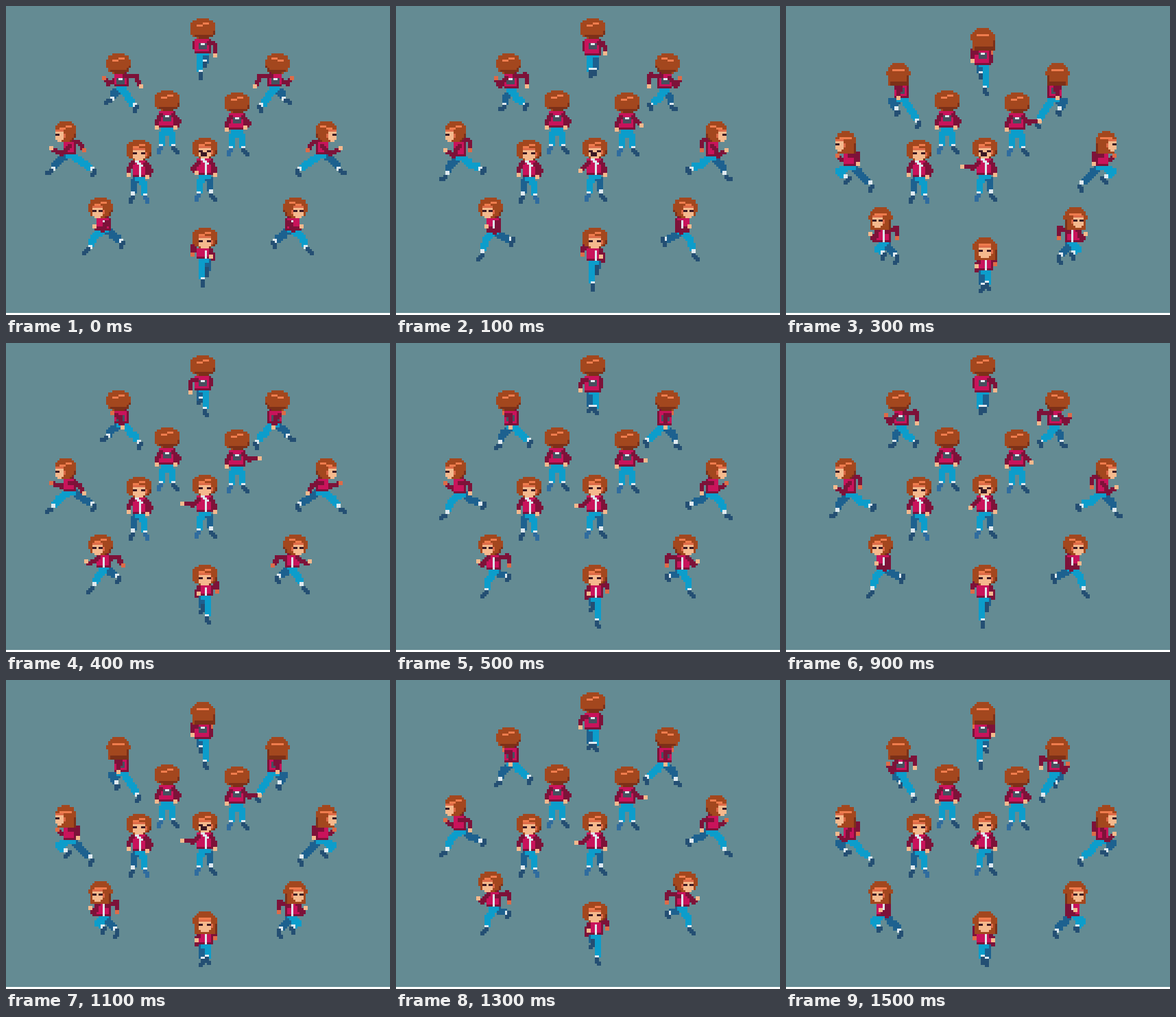
An HTML page with a canvas that plays this animation: 560 by 450 pixels, repeating every 1600 ms.

```html
<!DOCTYPE html>
<html lang="en">
<head>
<meta charset="utf-8">
<title>Run cycle turnaround</title>
<style>
html, body { margin: 0; width: 100%; height: 100%; overflow: hidden; background: #648b93; }
canvas { display: block; }
</style>
</head>
<body>
<canvas id="stage" width="560" height="450"></canvas>
<script>
const ctx = document.getElementById('stage').getContext('2d');
const CELL = 3, STEP = 100, POSES = 8, TILT = 0.25;
const C = {
  bg: '#648b93', hair: '#a3471e', hairDark: '#7c3018', glow: '#ef7c4d',
  skin: '#f5b98d', warm: '#de6b48', eye: '#3b1824',
  pink: '#c9135b', wine: '#7d1239', white: '#dfeaf0', ink: '#46505f',
  jean: '#0c9dcb', jeanDark: '#1d618f', shoe: '#244f73', shoeLit: '#2f6c9e'
};
const { cos, sin, PI, abs, round, sign, max, hypot } = Math;
const rad = deg => deg * PI / 180;
const lerp = (a, b, t) => a.map((v, i) => v + (b[i] - v) * t);

// Drawing is done in cells around an origin that may be mirrored.
let ox = 0, oy = 0, dir = 1;

function box(color, x, y, w, h) {
  ctx.fillStyle = color;
  ctx.fillRect(ox + (dir > 0 ? x : -x - w) * CELL, oy + y * CELL, w * CELL, h * CELL);
}

function line(color, w, [x0, y0], [x1, y1]) {
  const n = Math.ceil(max(1, abs(x1 - x0), abs(y1 - y0))), off = w / 2;
  for (let i = 0; i <= n; i++) {
    const t = i / n;
    box(color, round(x0 + (x1 - x0) * t - off), round(y0 + (y1 - y0) * t - off), w, w);
  }
}

// Body points are [forward, rightward, down], seen from heading h (90 faces the viewer).
const depth = ([f, s], h) => f * sin(h) + s * cos(h);
const project = (p, h) => [p[0] * cos(h) - p[1] * sin(h), p[2] + TILT * depth(p, h)];

// Middle joint of a limb made of two equal bones.
function joint(a, b, bone, bend) {
  const df = b[0] - a[0], dd = b[2] - a[2], len = hypot(df, dd) || 1;
  const out = bend * Math.sqrt(max(0, bone * bone - len * len / 4)) / len;
  const mid = lerp(a, b, 0.5);
  return [mid[0] + dd * out, mid[1], mid[2] - df * out];
}

function runLeg(p, side, hipY) {
  const a = 2 * PI * (p - 0.3) / POSES;
  const f = -5 - 11 * cos(a) + 3 * cos(2 * a);
  const d = hipY + 10 + 3 * cos(2 * PI * (p - 5.9) / POSES);
  const hip = [-2.5, side * 1.2, hipY];
  const ankle = [f - 1, side * 1.4, d - 2];
  const lift = f < -6 ? 0.6 : 0;
  return { hip, knee: joint(hip, ankle, 6.5, 1), ankle, toe: [f + 1 - lift, side * 1.5, d + lift - 0.5] };
}

function runArm(p, side) {
  const swing = cos(2 * PI * (p - 0.2) / POSES);
  const shoulder = [-1.5, side * 3.2, 11.5];
  const hand = [8 * swing - 1, side * (4.5 - 1.5 * swing), 14 - 1.5 * swing];
  const elbow = joint(shoulder, hand, 5, -1);
  elbow[1] += side;
  return { shoulder, elbow, hand };
}

function runPose(p) {
  const hipY = 17 - cos(PI * p / 2);
  return {
    hip: [-2.5, 0, hipY], neck: [-1.5, 0, 9], low: p % 4 === 3, shoe: C.shoe,
    legs: [runLeg(p, -1, hipY), runLeg(p + 4, 1, hipY)],
    arms: [runArm(p, -1), runArm(p + 4, 1)]
  };
}

// Standing: one hand on the hip or hanging, the other may reach out sideways.
function standPose(hipSide, reach, lead, mouth) {
  const leg = side => ({
    hip: [0, side * 1.5, 18], knee: [side * lead, side * 2.3, 22],
    ankle: [side * lead, side * 2.8, 28], toe: [side * lead, side * 4.5, 29.8]
  });
  const arm = side => {
    const active = side === hipSide;
    const rest = [0, side * (active ? 4 : 5), 17.5];
    const hand = active ? lerp(rest, [0, side * 11.5, 14], reach) : rest;
    const elbow = [0, side * (active ? 6 : 5), 14.5];
    return { shoulder: [0, side * 3.2, 11.5], elbow, hand };
  };
  return {
    hip: [0, 0, 18], neck: [0, 0, 9], low: false, mouth, shoe: C.shoeLit, still: true,
    legs: [leg(-1), leg(1)], arms: [arm(-1), arm(1)]
  };
}

function drawLeg(l, h, color, shoe) {
  const at = q => project(q, h);
  line(color, 3, at(l.hip), at(l.knee));
  line(color, 3, at(l.knee), at(lerp(l.knee, l.ankle, 0.5)));
  line(C.skin, 1, at(lerp(l.knee, l.ankle, 0.8)), at(l.ankle));
  const cuff = at(lerp(l.knee, l.ankle, 0.75));
  line(C.white, 2, cuff, cuff);
  line(shoe, 2, at(l.ankle), at(l.toe));
}

function drawArm(a, h, skin) {
  const [s, e, w] = [a.shoulder, a.elbow, a.hand].map(q => project(q, h));
  line(C.wine, 2, s, e);
  line(C.wine, 2, e, w);
  line(skin, 2, w, w);
}

function drawTorso(pose, h) {
  const top = project(pose.neck, h), end = project(pose.hip, h);
  const rows = round(end[1]) - 9, w = round(6 + 1.5 * abs(sin(h)));
  for (let i = 0; i < rows; i++) {
    const width = i === 0 ? w - 2 : w;
    const x = round(top[0] + (end[0] - top[0]) * i / rows - width / 2);
    box(i > rows - 2 ? C.wine : C.pink, x, 9 + i, width, 1);
    box(C.wine, x + width - 1, 9 + i, 1, 1);
    if (sin(h) > 0.5 && i > 1) box(C.white, x + (w >> 1), 9 + i, 1, 1);
  }
  const x = round(top[0]);
  if (sin(h) < -0.5) {
    box(C.ink, x - 2, 12, 4, 3);
    box(C.white, x - 1, 12, 2, 1);
  } else if (pose.still) {
    for (let i = 0; i < 3; i++) box(C.white, x - 2 + i, 10 + i, 2, 1);
  }
}

function drawHead(pose, h) {
  const { low, mouth } = pose, front = sin(h), back = front < -0.5;
  const rows = low ? 11 : 10, wide = 5 + abs(front);
  for (let y = 0; y < rows; y++) {
    const t = abs((y + 0.5) / rows * 2 - 1), n = low ? 2.2 : 2.6;
    const half = low && y > rows / 2 ? wide - 0.5 : wide * (1 - t ** n) ** (1 / n);
    const left = round(-half), w = round(half) - left;
    box(C.hair, left, y, w, 1);
    if (y > rows - 3 && back) box(C.hairDark, left + 1, y, w - 2, 1);
    if (y > rows / 2) box(C.hairDark, left + w - 1, y, 1, 1);
  }
  box(C.glow, -3, 3, 3, 1);
  box(C.glow, 0, low ? 3 : 2, 3, 1);
  if (back) return;

  const w = round(4 + 2 * front), x = round(3 * cos(h) * abs(cos(h)) - w / 2);
  box(C.warm, x, 4, w, 1);
  box(C.skin, x, 5, w, 4);
  box(C.skin, x + 1, 9, w - 2, 1);
  box(C.warm, x + w, 6, 1, 2);
  box(C.eye, x, 6, 2, 1);
  if (front > 0.5) box(C.eye, x + w - 2, 6, 2, 1);
  if (mouth) box(C.eye, x + 1, 7, 3, 2);
}

function figure(pose, h) {
  const legDepth = l => depth(l.knee, h) + depth(l.toe, h);
  const armDepth = a => depth(a.hand, h);
  const [farLeg, nearLeg] = [...pose.legs].sort((a, b) => legDepth(a) - legDepth(b));
  const [farArm, nearArm] = [...pose.arms].sort((a, b) => armDepth(a) - armDepth(b));
  const even = legDepth(nearLeg) - legDepth(farLeg) < 0.2;
  const hidden = armDepth(farArm) < -2;
  const hip = project(pose.hip, h);

  if (hidden) drawArm(farArm, h, C.warm);
  drawLeg(farLeg, h, even ? C.jean : C.jeanDark, C.shoe);
  line(C.jean, 3, [hip[0] - 1, hip[1]], [hip[0] + 1, hip[1]]);
  drawLeg(nearLeg, h, C.jean, pose.shoe);
  drawTorso(pose, h);
  if (!hidden) drawArm(farArm, h, pose.still ? C.skin : C.warm);
  drawArm(nearArm, h, C.skin);
  drawHead(pose, h);
}

function place(x, y, mirrored) {
  ox = x; oy = y; dir = mirrored ? -1 : 1;
}

// Heading, head position and, for turned runners, the x of the mirrored twin.
const ring = [
  { deg: 270, x: 287, y: 18 }, { deg: 225, x: 164, y: 69, twin: 396 },
  { deg: 180, x: 87, y: 168, twin: 467 }, { deg: 135, x: 138, y: 279, twin: 422 },
  { deg: 90, x: 290, y: 323 }
];

function draw(ms) {
  const p = Math.floor(ms / STEP) % POSES;
  ctx.fillStyle = C.bg;
  ctx.fillRect(0, 0, 560, 447);
  ctx.fillStyle = '#fff';
  ctx.fillRect(0, 447, 560, 3);

  const run = runPose(p), drop = 7 * max(0, p % 4 - 1);
  for (const { deg, x, y, twin } of ring) {
    place(x, y + drop);
    figure(run, rad(deg));
    if (!twin) continue;
    place(twin, y + drop, true);
    figure(run, rad(deg));
  }

  const reach = (1 - cos(2 * PI * (p + 0.6) / POSES)) / 2;
  place(235, 123);
  figure(standPose(1, 0, 0), rad(270));
  place(337, 126);
  figure(standPose(1, reach, 0), rad(270));
  place(194, 195);
  figure(standPose(-1, 0, -0.4), rad(100));
  place(290, 192);
  figure(standPose(1, reach, 0.4, p < 4), rad(90));
}

const start = performance.now();
function tick(now) {
  draw(max(0, now - start));
  requestAnimationFrame(tick);
}
draw(0);
requestAnimationFrame(tick);
</script>
</body>
</html>
```
